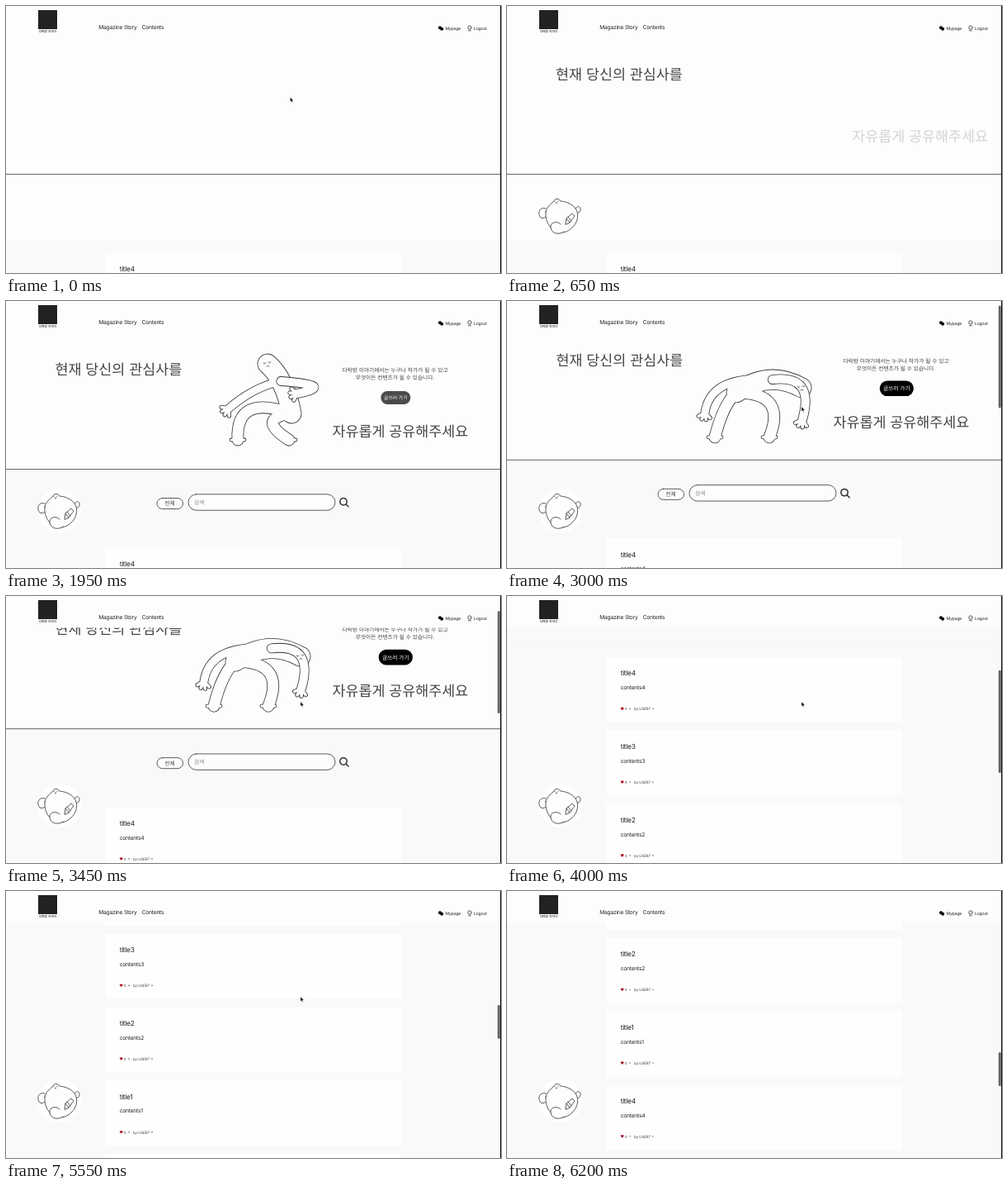
Animation, 600 px wide and 323 px high, one loop 6250 ms. Source, as an HTML page:

```html
<!DOCTYPE html>
<html lang="ko">
<head>
<meta charset="utf-8">
<style>
html, body { margin: 0; width: 100%; height: 100%; overflow: hidden; background: #fdfdfd; }
svg { display: block; width: 100%; height: 100%; }
text { font-family: Inter, "Noto Sans CJK KR", sans-serif; fill: #222; letter-spacing: -.035em; text-rendering: geometricPrecision; }
.ko { font-family: "Noto Sans CJK KR", "Noto Sans CJK", sans-serif; font-size: 6.7px; fill: #444; letter-spacing: 0; }
.big { font-size: 17.4px; font-weight: 300; }
.mid { text-anchor: middle; }
.nav { font-size: 6.7px; }
.small { font-size: 5.1px; }
.title { font-size: 8.4px; }
.meta { font-size: 4.5px; fill: #444; }
.ink { fill: #fdfdfd; stroke: #333; stroke-width: .8; stroke-linejoin: round; stroke-linecap: round; }
.line { fill: none; }
.tube { fill: none; stroke: #333; }
.inside { stroke: #fdfdfd; }
</style>
</head>
<body>
<svg viewBox="0 0 600 323">
  <g id="page">
    <rect y="283" width="600" height="2200" fill="#f9f9f9"/>
    <g id="search">
      <rect y="204" width="600" height="80" fill="#f9f9f9"/>
      <g class="ink">
        <rect x="183" y="238.5" width="31.5" height="13" rx="6.5"/>
        <rect x="221" y="233.8" width="178" height="19.4" rx="9.7"/>
        <path class="line" stroke-width="1.5" d="M413.2 242.8a4.2 4.2 0 1 0 -8.4 0a4.2 4.2 0 1 0 8.4 0M412 246l3 2.8"/>
      </g>
      <text class="ko mid" x="198.5" y="247.4">전체</text>
      <text class="ko" x="228" y="246" style="fill:#888">검색</text>
    </g>
    <rect y="203" width="600" height="1" fill="#666"/>
    <text id="left" class="ko big" x="59.5" y="89">현재 당신의 관심사를</text>
    <text id="right" class="ko big" x="395.5" y="164.3">자유롭게 공유해주세요</text>
    <g id="intro" class="mid">
      <text class="ko" x="471.5" y="86">다락방 이야기에서는 누구나 작가가 될 수 있고</text>
      <text class="ko" x="471.5" y="95.3">무엇이든 컨텐츠가 될 수 있습니다.</text>
    </g>
    <g id="button">
      <rect x="451.7" y="107.7" width="41.2" height="18.6" rx="9.3"/>
      <text class="ko mid" x="472.3" y="119.4" style="fill:#fff">글쓰러 가기</text>
    </g>
    <g id="figure" stroke-linecap="round"></g>
    <g id="cards"></g>
  </g>

  <g id="mascot">
    <circle cx="65" cy="254" r="26.5" fill="#fefefe"/>
    <g class="ink">
      <path d="M47 245C40 242 36 251 41 256Q45 258 48 254"/>
      <path d="M82 249C83 242 88 241 89 245Q90 249 85 251"/>
      <path d="M47 249Q48 243 56 237Q60 230 65 236C75 237 83 242 85 249C87 256 84 264 79 268C72 276 58 276 53 268Q46 260 47 249Z"/>
      <path d="M65 264C60 259 52 262 53 268C54 276 64 277 69 273"/>
      <path d="M71 264L72 257L79 251L82 254L76 262ZM72 257L76 262M74 255L78 260"/>
      <path class="line" d="M58 236.5h.1M62 236.5h.1M59 238.3q1 1 2 0"/>
    </g>
  </g>

  <rect width="600" height="38.5" fill="#fdfdfd"/>
  <rect x="39" y="5" width="23" height="23" fill="#222"/>
  <text class="ko mid" x="50.5" y="32.3" style="font-size:3.7px;font-weight:700">다락방 이야기</text>
  <text class="nav" x="112.3" y="28.4">Magazine Story</text>
  <text class="nav" x="164.7" y="28.4">Contents</text>
  <circle cx="526" cy="26.3" r="2"/><circle cx="528.2" cy="27.8" r="2"/>
  <text class="small" x="532.6" y="29.1">Mypage</text>
  <path class="ink line" d="M564.2 26a2.2 2.2 0 1 0 -4.4 0a2.2 2.2 0 1 0 4.4 0M560.5 29.8h3"/>
  <text class="small" x="567" y="29.1">Logout</text>

  <rect id="thumb" x="595.8" width="3" rx="1.5" fill="#666"/>
  <rect x="599" width="1" height="323" fill="#111"/>
  <path id="cursor" d="M0 0V5.5L1.3 4.3L2.2 6.3L3.1 5.9L2.2 4H4Z" stroke="#fff" stroke-width=".3"/>
</svg>
<script>
const LOOP = 6250, STAGE = 323, CARD_STEP = 88.75;
const $ = id => document.getElementById(id);
const clamp = u => Math.max(0, Math.min(1, u));
const part = (t, start, length) => clamp((t - start) / length);
const rest = (t, start, length) => (1 - part(t, start, length)) ** 3;
const mix = (a, b, u) => a + (b - a) * u;
const place = (id, transform, opacity = 1) => {
  $(id).setAttribute('transform', transform);
  $(id).setAttribute('opacity', opacity);
};
const zoom = (x, y, s, dy = 0) => `translate(${x} ${y + dy}) scale(${s}) translate(${-x} ${-y})`;

// Joints of the figure; "size" scales the thickness of its limbs.
const lying = {
  head: [267, 110], back: [310, 111], hip: [338, 119],
  elbowL: [228, 105], handL: [247, 124], elbowR: [372, 108], handR: [366, 121],
  kneeL: [285, 118], footL: [285, 129], kneeR: [320, 118], footR: [350, 129], size: [.45]
};
const crouched = {
  head: [317, 76], back: [338, 94], hip: [346, 136],
  elbowL: [300, 104], handL: [270, 130], elbowR: [402, 102], handR: [353, 112],
  kneeL: [278, 112], footL: [281, 168], kneeR: [302, 142], footR: [343, 168], size: [1]
};
const bent = {
  head: [357, 116], back: [318, 94], hip: [278, 122],
  elbowL: [247, 100], handL: [240, 146], elbowR: [374, 100], handR: [358, 155],
  kneeL: [262, 136], footL: [252, 176], kneeR: [340, 122], footR: [318, 176], size: [1]
};
const blend = (a, b, u) => Object.fromEntries(
  Object.keys(a).map(k => [k, a[k].map((v, i) => mix(v, b[k][i], u))]));
const upright = Object.fromEntries(
  Object.entries(crouched).map(([k, [x, y]]) => [k, y ? [x, 172 - (172 - y) * 1.14] : [x]]));
const poses = [[1150, lying], [1950, crouched], [2400, upright], [3000, bent]];
const scrollKeys = [[2700, 0], [3400, 26], [4000, 224], [4900, 606], [6250, 1517]];

// Finds the two keys around t and the progress between them.
function between(keys, t) {
  let i = 0;
  while (i < keys.length - 2 && t >= keys[i + 1][0]) i++;
  const [from, a] = keys[i], [to, b] = keys[i + 1];
  return [a, b, part(t, from, to - from)];
}

const bow = (from, via, to) => `M${from}Q${via} ${to}`;

function fingers(elbow, [x, y], size) {
  const angle = Math.atan2(y - elbow[1], x - elbow[0]);
  return [-.9, -.3, .3, .9].map(turn => {
    const a = angle + turn;
    return `M${x} ${y}l${9 * size * Math.cos(a)} ${9 * size * Math.sin(a)}`;
  }).join('');
}

// Joins tubes into one outlined shape: all edges first, then all insides.
const outline = tubes =>
  tubes.map(([d, w]) => `<path class="tube" d="${d}" stroke-width="${w + .8}"/>`).join('') +
  tubes.map(([d, w]) => `<path class="tube inside" d="${d}" stroke-width="${w - .8}"/>`).join('');

function drawFigure(t) {
  const [a, b, u] = between(poses, t);
  const p = blend(a, b, u * u * (3 - 2 * u)), size = p.size[0];
  const chest = [0, 1].map(i => .3 * p.head[i] + .5 * p.back[i] + .2 * p.hip[i]);
  const sole = ([x, y]) => `M${x - 8} ${y}h16`;
  const [hx, hy] = p.head;
  $('figure').innerHTML = outline([
    [bow(p.head, p.back, p.hip), 24 * size],
    [bow(chest, p.elbowL, p.handL), 10 * size],
    [bow(p.hip, p.kneeL, p.footL), 14 * size],
    [bow(p.hip, p.kneeR, p.footR), 14 * size],
    [sole(p.footL) + sole(p.footR), 4 * size],
    [fingers(p.elbowL, p.handL, size), 4.5 * size]
  ]) + outline([
    [bow(chest, p.elbowR, p.handR), 11 * size],
    [fingers(p.elbowR, p.handR, size), 4.5 * size]
  ]) + `<path class="tube" stroke-width=".8" opacity="${clamp(size * 2 - 1)}"
    d="M${hx - 5} ${hy - 1}q1.5 2 3 0m3 -1q1.5 2 3 0m-5 5q2 -1.5 3 0"/>`;
  $('figure').setAttribute('opacity', part(t, 800, 500));
}

function drawScroll(t) {
  const s = mix(...between(scrollKeys, t));
  place('page', `translate(0 ${-s})`);
  // The thumb shrinks each time more cards are loaded.
  const loaded = s < 400 ? 6 : s < 1000 ? 12 : 24;
  const height = STAGE * 303 / (256 + loaded * CARD_STEP);
  $('thumb').setAttribute('height', height);
  place('thumb', `translate(0 ${1 + s * 1.03 * height / STAGE})`, t >= 2750 ? 1 : 0);
}

function draw() {
  const t = performance.now() % LOOP;
  place('left', `translate(${-33 * rest(t, 150, 650)} 0)`, part(t, 150, 500));
  place('right', `translate(${35 * rest(t, 550, 750)} 0)`, part(t, 550, 450));
  place('mascot', zoom(65, 254, 1 + .35 * rest(t, 150, 600)), part(t, 150, 400));
  const r = rest(t, 750, 700);
  place('search', zoom(299.5, 243.5, 1 + .33 * r, 68 * r), part(t, 750, 650));
  const shown = part(t, 1000, 600);
  place('intro', `translate(0 ${40 * (1 - shown)})`, shown);
  const u = part(t, 1500, 640);
  place('button', zoom(472.3, 117, mix(.57, 1, u)), u);
  drawFigure(t);
  drawScroll(t);
  const early = t < 450;
  place('cursor', early ? 'translate(344.5 110.5)' : 'translate(357 128)', early || t > 2800 && t < 5600 ? 1 : 0);
  requestAnimationFrame(draw);
}

for (let i = 0; i < 24; i++) {
  const n = 4 - i % 4;
  $('cards').innerHTML += `<g transform="translate(120 ${298.3 + i * CARD_STEP})">
    <rect width="359" height="78.5" fill="#fefefe"/>
    <text class="title" x="17.7" y="22.6">title${n}</text>
    <text class="nav" x="17.7" y="39.2">contents${n}</text>
    <path fill="#b0102c" d="M19.7 64.3l-1.7 -1.8a1 1 0 0 1 1.7 -1.3a1 1 0 0 1 1.7 1.3Z"/>
    <text class="meta" x="22.7" y="64.3">0</text>
    <circle cx="29" cy="62.5" r=".7" fill="#333"/>
    <text class="meta" x="34" y="64.3" font-style="italic">by USER7</text>
    <circle cx="57" cy="62.5" r=".7" fill="#333"/>
  </g>`;
}
draw();
</script>
</body>
</html>
```
